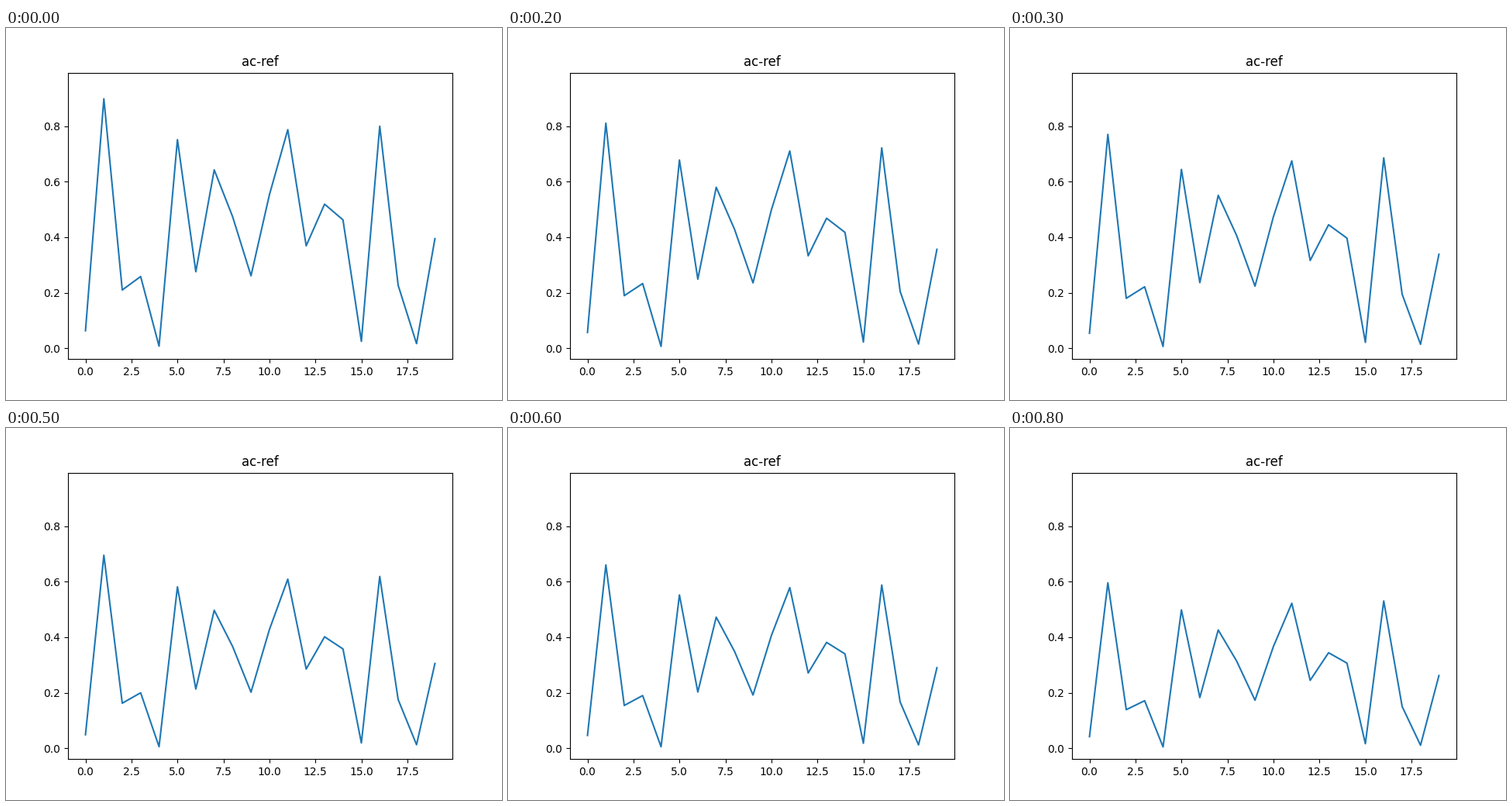
Write a matplotlib script that moves like this. It is 640x480 px and loops after 900 ms.

```python
import numpy as np
import matplotlib.pyplot as plt
from matplotlib.animation import FuncAnimation

FRAMES = 9
INTERVAL = 100
DECAY = 0.95

x = np.arange(20)
start = np.array([
    0.0637, 0.898, 0.2103, 0.2587, 0.0081, 0.751, 0.2760, 0.6423, 0.474, 0.2613,
    0.5525, 0.787, 0.3692, 0.519, 0.4626, 0.0255, 0.7995, 0.2273, 0.0173, 0.3950,
])

fig, ax = plt.subplots(figsize=(6.4, 4.8), dpi=100)
# Axis limits are fitted once, one decay step before the loop begins.
line, = ax.plot(x, start / DECAY, color="#1f77b4", lw=1.5)
ax.set_xlim(-0.95, 19.95)
ax.set_ylim(ax.get_ylim())
ax.set_xticks(np.arange(0, 20, 2.5))
ax.set_yticks(np.arange(0, 0.9, 0.2))
ax.set_title("ac-ref")


def update(i):
    line.set_ydata(start * DECAY ** i)
    return line,


def init():
    return update(0)


anim = FuncAnimation(fig, update, frames=FRAMES, init_func=init,
                     interval=INTERVAL, repeat=True, repeat_delay=0)
plt.show()
```
